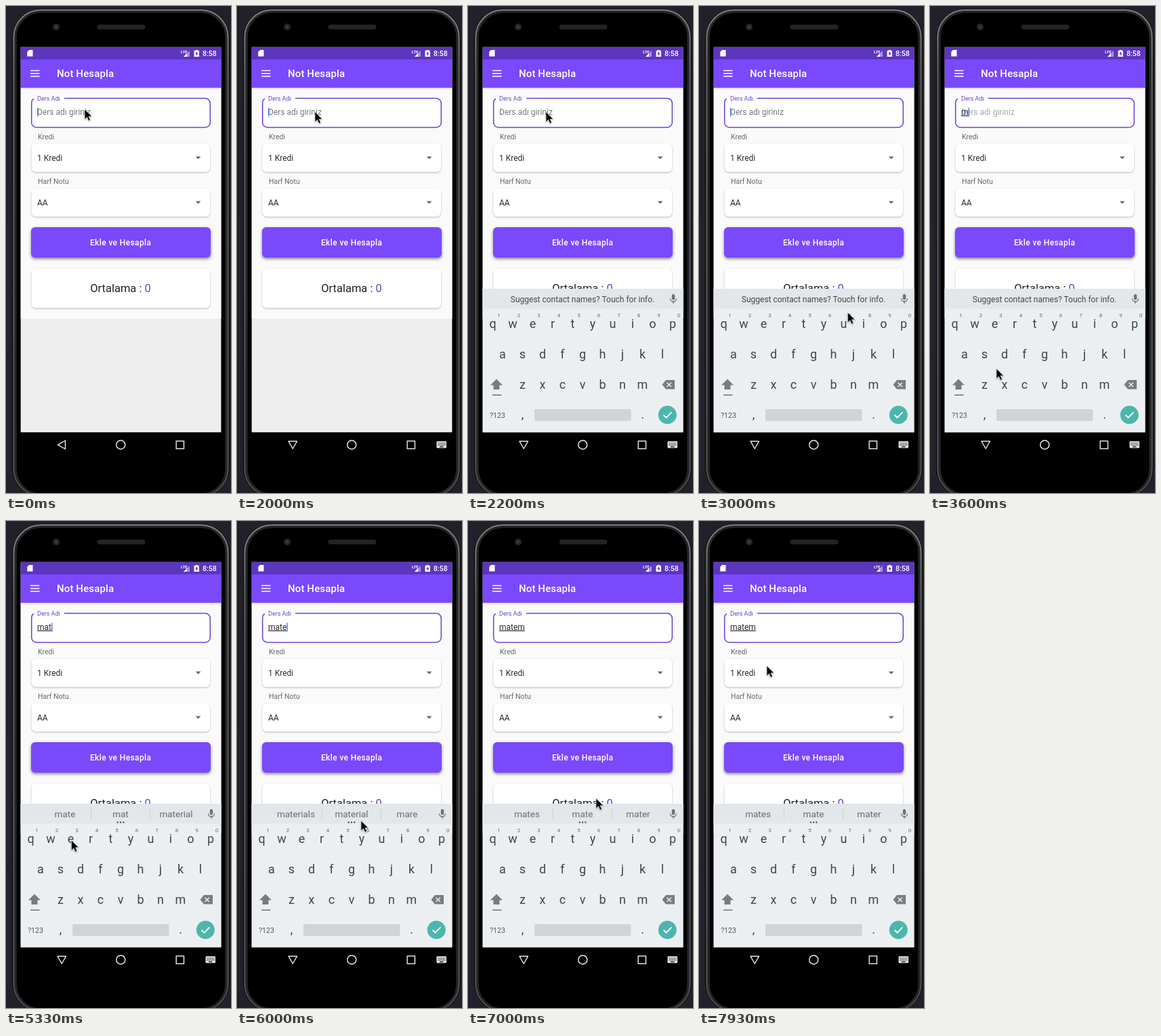
Write an HTML page that moves like this. It is 332x720 px and loops after 8000 ms.

```html
<!DOCTYPE html>
<html lang="tr">
<head>
<meta charset="utf-8">
<title>Not Hesapla</title>
<style>
  html, body { margin: 0; width: 100%; height: 100%; overflow: hidden; background: #20212a; }
  svg { display: block; width: 100vw; height: 100vh; font-family: Roboto, sans-serif; }
  text { white-space: pre; }
  .mid { text-anchor: middle; }
  .medium { font-weight: 500; fill: #fff; }
  .caption { font-size: 10.5px; fill: #686868; }
  .input { font-size: 12px; fill: #2b2b2b; }
  .card { fill: #fff; filter: drop-shadow(0 1px 1.1px #0004); }
  .key { font-size: 18px; fill: #3c474d; text-anchor: middle; }
  .digit { font-size: 8px; fill: #5f696e; text-anchor: middle; }
  .word { font-size: 13.5px; fill: #656b6f; text-anchor: middle; }
  .line { fill: none; stroke: #eee; stroke-width: 1.4; }
</style>
</head>
<body>
<svg viewBox="0 0 332 720" preserveAspectRatio="none">
  <defs>
    <clipPath id="screen"><rect x="21.7" y="60.7" width="295.700" height="569.600"/></clipPath>
    <linearGradient id="rim" x2="0" y2="1">
      <stop offset="0" stop-color="#77787c"/>
      <stop offset=".15" stop-color="#58595c"/>
      <stop offset="1" stop-color="#4a4b4e"/>
    </linearGradient>
  </defs>

  <!-- Phone body -->
  <path d="M3 316V514M3 518V690H8" fill="none" stroke="#2c2d36"/>
  <rect x="8" y="3" width="323" height="724" rx="44" fill="#0b0b0c" stroke="#2c2c2f"/>
  <rect x="11.500" y="6" width="316" height="718" rx="40" fill="none" stroke="url(#rim)" stroke-width="2.600"/>
  <rect x="14.300" y="8.800" width="310.400" height="713" rx="37" fill="#000" stroke="#242426" stroke-width="3"/>
  <circle cx="74" cy="31" r="5" fill="#25262c"/>
  <circle cx="74" cy="31" r="2" fill="#3a3c4c"/>
  <rect x="134.5" y="27.5" width="71" height="7" rx="3.5" fill="#242426"/>

  <g clip-path="url(#screen)">
    <rect x="21" y="60" width="297" height="571" fill="#eee"/>
    <rect x="21" y="121" width="297" height="341" fill="#fafafa"/>
    <rect x="21" y="79" width="297" height="41.800" fill="#7a49fc" style="filter:drop-shadow(0 1px 1.2px #0003)"/>
    <rect x="21" y="60" width="297" height="19" fill="#5c36bf"/>

    <!-- Status bar -->
    <g fill="#fff">
      <path d="M34 65H39.500V74.500H31.300V67.700Z"/>
      <text x="258" y="70" font-size="6" font-weight="700">LTE</text>
      <path d="M271 66V75H262Z" opacity=".45"/>
      <path d="M267 70V75H262Z"/>
      <path d="M279.500 66V65H283V66H285V75H277.500V66Z"/>
      <path d="M282 67L279.300 71H281V74L283.500 70H282Z" fill="#5c36bf"/>
      <text x="290" y="74" font-size="10.5" class="medium">8:58</text>
    </g>

    <!-- App bar -->
    <path d="M36 95.500H49.500M36 99.700H49.500M36 104H49.500" stroke="#fff" stroke-width="1.4"/>
    <text x="75" y="105" class="medium" font-size="15" letter-spacing=".11">Not Hesapla</text>

    <!-- Form -->
    <rect x="37.700" y="136.500" width="263.600" height="43" rx="7.500" fill="#fff"/>
    <path d="M86 136.500H294A7.300 7.300 0 0 1 301.300 144V172A7.300 7.300 0 0 1 294 179.500H45A7.300 7.300 0 0 1 37.700 172V144Q37.700 138.500 41 137.200"
      fill="none" stroke="#6a3fd2" stroke-width="1.5"/>
    <text x="46" y="140" font-size="9" fill="#6c42d0">Ders Adı</text>
    <text id="hint" x="46" y="161" class="input" style="fill:#777">Ders adı giriniz</text>
    <text id="typed" x="46" y="160.700" class="input" text-decoration="underline"></text>
    <rect id="caret" y="150.500" width="1.500" height="13" fill="#5b86ee"/>

    <text x="47" y="197" class="caption">Kredi</text>
    <rect x="37.500" y="203.500" width="263.500" height="42" rx="6.500" class="card"/>
    <text x="46" y="228.500" class="input">1 Kredi</text>
    <path d="M279.800 222.500H287.500L283.650 226.400Z" fill="#666"/>

    <text x="47" y="263" class="caption">Harf Notu</text>
    <rect x="37.500" y="269.500" width="263.500" height="42" rx="6.500" class="card"/>
    <text x="46" y="294.500" class="input">AA</text>
    <path d="M279.800 288.500H287.500L283.650 292.400Z" fill="#666"/>

    <rect x="37" y="327" width="265" height="45" rx="6" fill="#7a49fc" style="filter:drop-shadow(0 2px 2.200px #0007)"/>
    <text x="169.200" y="354" class="medium mid" font-size="12" letter-spacing=".375">Ekle ve Hesapla</text>

    <rect x="37.500" y="388.500" width="263.500" height="58" rx="6" class="card"/>
    <text x="169" y="422.500" class="mid" font-size="16.500" fill="#222">Ortalama : <tspan fill="#6741c6">0</tspan></text>

    <!-- Keyboard -->
    <g id="keyboard">
      <rect x="21" y="418" width="297" height="213" fill="#eceff1"/>
      <rect x="21" y="418" width="297" height="29.500" fill="#e4e7e9"/>
      <text id="notice" x="169" y="438" class="mid" font-size="12" fill="#41484c">Suggest contact names? Touch for info.</text>
      <g id="suggestions">
        <path d="M125.500 425V441M212.500 425V441" stroke="#cdd1d3"/>
        <text x="87" y="438" class="word"></text>
        <text x="169" y="438" class="word"></text>
        <text x="251" y="438" class="word"></text>
        <path d="M164.800 445.500H174" stroke="#4a5154" stroke-width="2.400" stroke-linecap="round" stroke-dasharray="0 4.300"/>
      </g>
      <g fill="#6a7378">
        <rect x="300.800" y="426" width="4.400" height="8.500" rx="2.200"/>
        <path d="M298.500 432.500A4.500 4.500 0 0 0 307.500 432.500M303 437V440" fill="none" stroke="#6a7378" stroke-width="1.300"/>
        <path d="M42 551.500L51 560.500H46.500V567H37.500V560.500H33Z" fill="#757d81"/>
        <path d="M36 574.500H49.500V576H36Z"/>
        <path d="M292 553H305V566.500H292L286.500 559.750Z" fill="#757d81"/>
        <path d="M293.500 556.700L300 563M300 556.700L293.500 563" stroke="#eceff1" stroke-width="1.500"/>
      </g>
      <g id="keys"></g>
      <text x="43.500" y="608.500" class="mid" font-size="10.500" fill="#4c565b">?123</text>
      <text x="80.500" y="610" class="key">,</text>
      <rect x="98" y="596" width="142.500" height="17.500" rx="2" fill="#d0d4d6"/>
      <text x="257.500" y="610" class="key">.</text>
      <circle cx="294.300" cy="604.500" r="13.500" fill="#4db6ac"/>
      <path d="M288.500 604.700L292.500 608.700L300.500 600.500" fill="none" stroke="#fff" stroke-width="1.700"/>
    </g>
  </g>

  <!-- Navigation bar -->
  <path id="back" class="line" stroke-linejoin="round"/>
  <circle cx="169.300" cy="648.700" r="6.500" class="line"/>
  <rect x="251.200" y="643.200" width="11.300" height="11.300" class="line"/>
  <g id="switcher">
    <rect x="294.500" y="643.500" width="14.500" height="10" rx="1.200" fill="#e8e8e8"/>
    <path d="M296.500 646.300H307.500M296.500 649H307.500" stroke="#000" stroke-width="1.300" stroke-dasharray="1.300 1.100"/>
    <path d="M299 651.700H304.500" stroke="#000" stroke-width="1.200"/>
  </g>

  <path id="pointer" d="M0 0V15L3.500 11.800L5.900 17.200L8.500 16L6.100 10.800H10.800Z"
    fill="#050505" stroke="#fff" stroke-width=".8" stroke-opacity=".8" style="filter:drop-shadow(0 1px 1px #0005)"/>
</svg>

<script>
const LOOP = 8000;
const $ = id => document.getElementById(id);
const clamp = v => Math.max(0, Math.min(1, v));
const ease = v => v * v * (3 - 2 * v);

const POINTER = [ // time, x, y
  [0, 116, 152.500], [1500, 116, 152.500], [1900, 115, 156.500], [2650, 115, 156.500],
  [3180, 257, 560], [3360, 257, 560], [3600, 98, 536], [3760, 52, 516],
  [3980, 52, 516], [4670, 144.500, 470], [4780, 153, 472], [4980, 153, 472],
  [5350, 96, 472], [5600, 96, 472], [6000, 183, 443], [6240, 257, 560],
  [6500, 257, 560], [7600, 100, 214], [LOOP, 100, 214]
];
const TYPING = [ // time, text, suggestions
  [3540, 'm', ['me', 'm', 'my']],
  [3960, 'ma', ['made', 'MA', 'many']],
  [4920, 'mat', ['mate', 'mat', 'material']],
  [5560, 'mate', ['materials', 'material', 'mare']],
  [6410, 'matem', ['mates', 'mate', 'mater']]
];
const KEYBOARD_AT = 2050, NAV_AT = 1950, SUGGEST_DELAY = 90;

function addText(x, y, cls, text) {
  const el = document.createElementNS('http://www.w3.org/2000/svg', 'text');
  el.setAttribute('x', x);
  el.setAttribute('y', y);
  el.setAttribute('class', cls);
  el.textContent = text;
  $('keys').append(el);
}
[['qwertyuiop', 36.500, 475.500], ['asdfghjkl', 51, 521], ['zxcvbnm', 80.500, 566]].forEach(([row, x, y]) =>
  [...row].forEach((letter, i) => addText(x + i * 29.500, y, 'key', letter)));
[...'1234567890'].forEach((digit, i) => addText(45.500 + i * 29.500, 460, 'digit', digit));

function pointerAt(t) {
  const i = POINTER.findIndex(p => p[0] > t);
  const [t0, x0, y0] = POINTER[i - 1], [t1, x1, y1] = POINTER[i];
  const k = ease((t - t0) / (t1 - t0));
  return [x0 + (x1 - x0) * k, y0 + (y1 - y0) * k];
}

const show = (id, on) => $(id).style.display = on ? '' : 'none';
const latest = t => TYPING.filter(step => step[0] <= t).pop();
const words = document.querySelectorAll('.word');

function render(t) {
  const [since, text] = latest(t) || [0, ''];
  $('typed').textContent = text;
  $('hint').style.opacity = 1 - clamp((t - TYPING[0][0]) / 170);
  $('caret').setAttribute('x', 46 + (text ? $('typed').getComputedTextLength() : 0));
  // Opening the keyboard shifts the blink phase; each keystroke restarts it.
  const blinkStart = text ? since : t < 1640 ? 0 : 1640;
  show('caret', (t - blinkStart) % 1000 < 500);

  const offer = latest(t - SUGGEST_DELAY);
  show('notice', !offer);
  show('suggestions', offer);
  words.forEach((word, i) => word.textContent = offer ? offer[2][i] : '');

  const slide = 1 - Math.pow(1 - clamp((t - KEYBOARD_AT) / 130), 2);
  $('keyboard').setAttribute('transform', `translate(0 ${213 * (1 - slide)})`);
  const open = t >= NAV_AT;
  show('switcher', open);
  $('back').setAttribute('d', open ? 'M76 643.500H88.500L82.250 654.500Z' : 'M76.500 648.700L87.500 642.500V655Z');

  $('pointer').setAttribute('transform', `translate(${pointerAt(t)})`);
}

function frame() {
  render(performance.now() % LOOP);
  requestAnimationFrame(frame);
}
frame();
</script>
</body>
</html>
```
